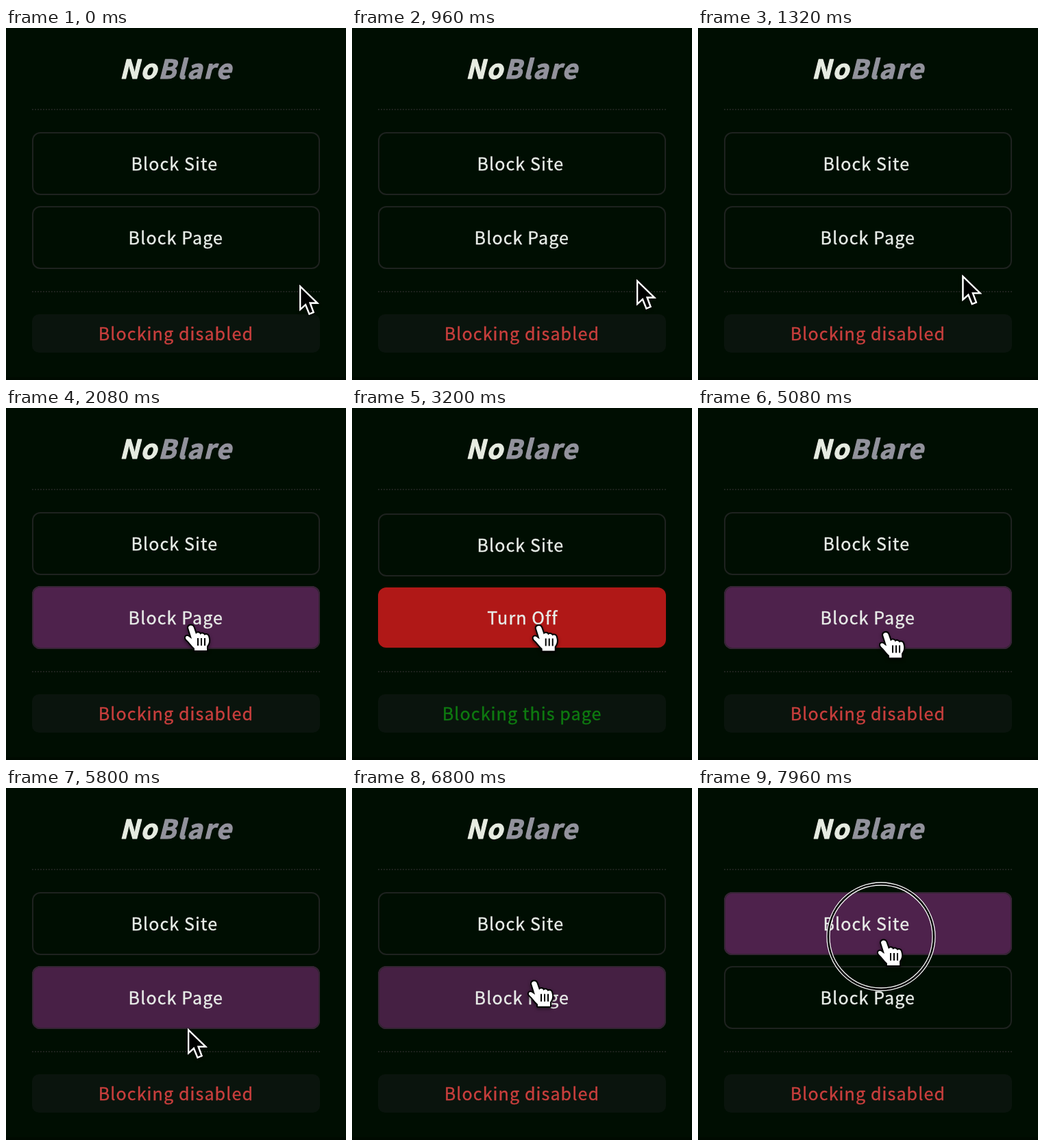
These frames come from a looping animation (496x514 px, 8 s). An HTML page with a canvas:

```html
<!DOCTYPE html>
<html lang="en">
<head>
<meta charset="utf-8">
<title>Blocker popup</title>
<style>
html, body { margin: 0; width: 100%; height: 100%; overflow: hidden; background: #000e02; }
canvas { display: block; }
</style>
</head>
<body>
<canvas id="stage" width="496" height="514"></canvas>
<script>
const ctx = document.getElementById('stage').getContext('2d');
const LOOP = 8000;
const FONT = '"Noto Sans CJK JP", "Noto Sans CJK SC", "Noto Sans", sans-serif';
const INK = '#e8ece8';
const FADE = 200;

// Pointer path: time, x, y
const PATH = [
  [0, 428, 375], [500, 422, 371], [960, 415, 367], [1300, 388, 361],
  [1640, 318, 351], [1860, 282, 328], [2080, 270, 318], [2600, 272, 317],
  [2840, 272, 317], [3600, 274, 321], [4480, 276, 324], [4800, 276, 324],
  [5400, 270, 338], [5800, 265, 351], [6100, 263, 368], [6350, 263, 370],
  [6625, 264, 350], [6800, 266, 283], [7000, 267, 254], [7300, 269, 230],
  [7700, 271, 223], [8000, 271, 223]
];
const PAGE_HOVER = [[1640, 5785], [6625, 7080]];
const SITE_HOVER = [[7160, 8400]];
const PRESSES = [[2840, 3000], [4600, 4760], [7940, 8400]];
const BLOCKING = [3000, 4760];

const inside = (t, [a, b]) => t >= a && t < b;
const inAny = (t, spans) => spans.some(s => inside(t, s));
const clamp = v => Math.max(0, Math.min(1, v));

function fade(t, spans) {
  return Math.max(...spans.map(([a, b]) =>
    Math.min(clamp((t - a) / FADE), 1 - clamp((t - b) / FADE))));
}

function mix(a, b, k) {
  return `rgb(${a.map((v, i) => Math.round(v + (b[i] - v) * k)).join(',')})`;
}

// Cubic interpolation that never overshoots its points
function slope(i, c) {
  if (i === 0 || i === PATH.length - 1) return 0;
  const [p, q, r] = [PATH[i - 1], PATH[i], PATH[i + 1]];
  const a = (q[c] - p[c]) / (q[0] - p[0]);
  const b = (r[c] - q[c]) / (r[0] - q[0]);
  return a * b <= 0 ? 0 : 2 * a * b / (a + b);
}

function pointer(t) {
  let i = 0;
  while (i < PATH.length - 2 && t >= PATH[i + 1][0]) i++;
  const p = PATH[i], q = PATH[i + 1], d = q[0] - p[0], u = (t - p[0]) / d;
  const at = c => {
    const s = u * u * (3 - 2 * u);
    return p[c] + (q[c] - p[c]) * s
      + d * u * (1 - u) * ((1 - u) * slope(i, c) - u * slope(i + 1, c));
  };
  return [at(1), at(2)];
}

function box(x, y, w, h, r, fill, border) {
  ctx.beginPath();
  ctx.roundRect(x, y, w, h, r);
  ctx.fillStyle = fill;
  ctx.fill();
  if (!border) return;
  ctx.beginPath();
  ctx.roundRect(x + 1, y + 1, w - 2, h - 2, r - 1);
  ctx.strokeStyle = border;
  ctx.lineWidth = 2;
  ctx.stroke();
}

// A thin stroke brings the letters to the right weight
function write(str, x, y, color, weight) {
  ctx.fillStyle = ctx.strokeStyle = color;
  ctx.lineWidth = weight;
  ctx.lineJoin = 'round';
  ctx.fillText(str, x, y);
  ctx.strokeText(str, x, y);
}

function label(str, x, y, color) {
  ctx.font = `400 25.07px ${FONT}`;
  ctx.letterSpacing = '1.1px';
  write(str, x, y, color, 0.4);
}

function button(str, x, y, hover) {
  box(38, y, 420, 92, 12,
    mix([0, 14, 2], [78, 34, 76], hover), mix([30, 34, 31], [54, 36, 53], hover));
  label(str, x, y + 56, INK);
}

// Dots are spaced so that both ends of the line carry one
function dots(y) {
  ctx.beginPath();
  ctx.moveTo(38, y);
  ctx.lineTo(458, y);
  ctx.strokeStyle = '#1e231e';
  ctx.lineWidth = 2;
  ctx.setLineDash([2, 208 / 105]);
  ctx.stroke();
  ctx.setLineDash([]);
}

function title() {
  ctx.font = `italic 900 38px ${FONT}`;
  ctx.letterSpacing = '2px';
  const head = ctx.measureText('No').width;
  const x = 248 - (head + ctx.measureText('Blare').width) / 2;
  write('No', x, 74, '#e6ebe1', 1.2);
  write('Blare', x + head, 74, '#92929c', 1.2);
}

function ring(x, y) {
  const circle = (r, w, color) => {
    ctx.beginPath();
    ctx.arc(x, y, r, 0, Math.PI * 2);
    ctx.lineWidth = w;
    ctx.strokeStyle = color;
    ctx.stroke();
  };
  circle(77, 4, '#000');
  circle(79, 1.3, '#f4f4f4');
  circle(75, 1.3, '#f4f4f4');
}

const ARROW = new Path2D('M1.2 2.5V36L9 29L14.5 42.5L20.5 40L15.5 26.5H26Z');
const HAND = new Path2D('M-4 3C-4-1 2-2 3.5 2L7 12C9 9 13 10 13.5 13C16 10 19 12 19.5 14' +
  'C22 12 25 13 25.5 17C27 22 26 26 23 30V36H5V33C0 29-2 24-7 20C-10 16-6 13-2 17L1 19Z');
const CREASES = new Path2D('M10 18V29M15 18V29M20 18V29');

function cursor(x, y, hand) {
  const shape = hand ? HAND : ARROW;
  ctx.save();
  ctx.translate(x, y);
  ctx.lineJoin = hand ? 'round' : 'miter';
  ctx.shadowColor = 'rgba(0,0,0,.5)';
  ctx.shadowBlur = 4;
  ctx.shadowOffsetY = 2;
  ctx.strokeStyle = hand ? '#000' : '#fff';
  ctx.fillStyle = hand ? '#fff' : '#000';
  ctx.lineWidth = hand ? 4 : 2.3;
  ctx.stroke(shape);
  ctx.shadowColor = 'transparent';
  ctx.fill(shape);
  if (hand) ctx.lineWidth = 2;
  ctx.stroke(hand ? CREASES : shape);
  ctx.restore();
}

function draw(t) {
  const on = inside(t, BLOCKING);
  ctx.fillStyle = '#000e02';
  ctx.fillRect(0, 0, 496, 514);
  ctx.fillStyle = '#000a01';
  ctx.fillRect(0, 510, 496, 4);

  title();
  dots(119);
  dots(385);

  button('Block Site', 182.4, on ? 154 : 152, fade(t, SITE_HOVER));
  if (on) {
    box(38, 262, 420, 88, 12, '#b01817');
    label('Turn Off', 197.3, 316, INK);
  } else {
    button('Block Page', 178.6, 260, fade(t, PAGE_HOVER));
  }

  box(38, 418, 420, 56, 10, '#0a140d');
  if (on) label('Blocking this page', 131.7, 456, '#0e7a10');
  else label('Blocking disabled', 134.7, 456, '#c93f3d');

  const [x, y] = pointer(t);
  if (inAny(t, PRESSES)) ring(x - 4, y - 6);
  cursor(x, y, inAny(t, PAGE_HOVER) || inAny(t, SITE_HOVER));
}

const start = performance.now();
function tick() {
  draw((performance.now() - start) % LOOP);
  requestAnimationFrame(tick);
}
tick();
</script>
</body>
</html>
```
